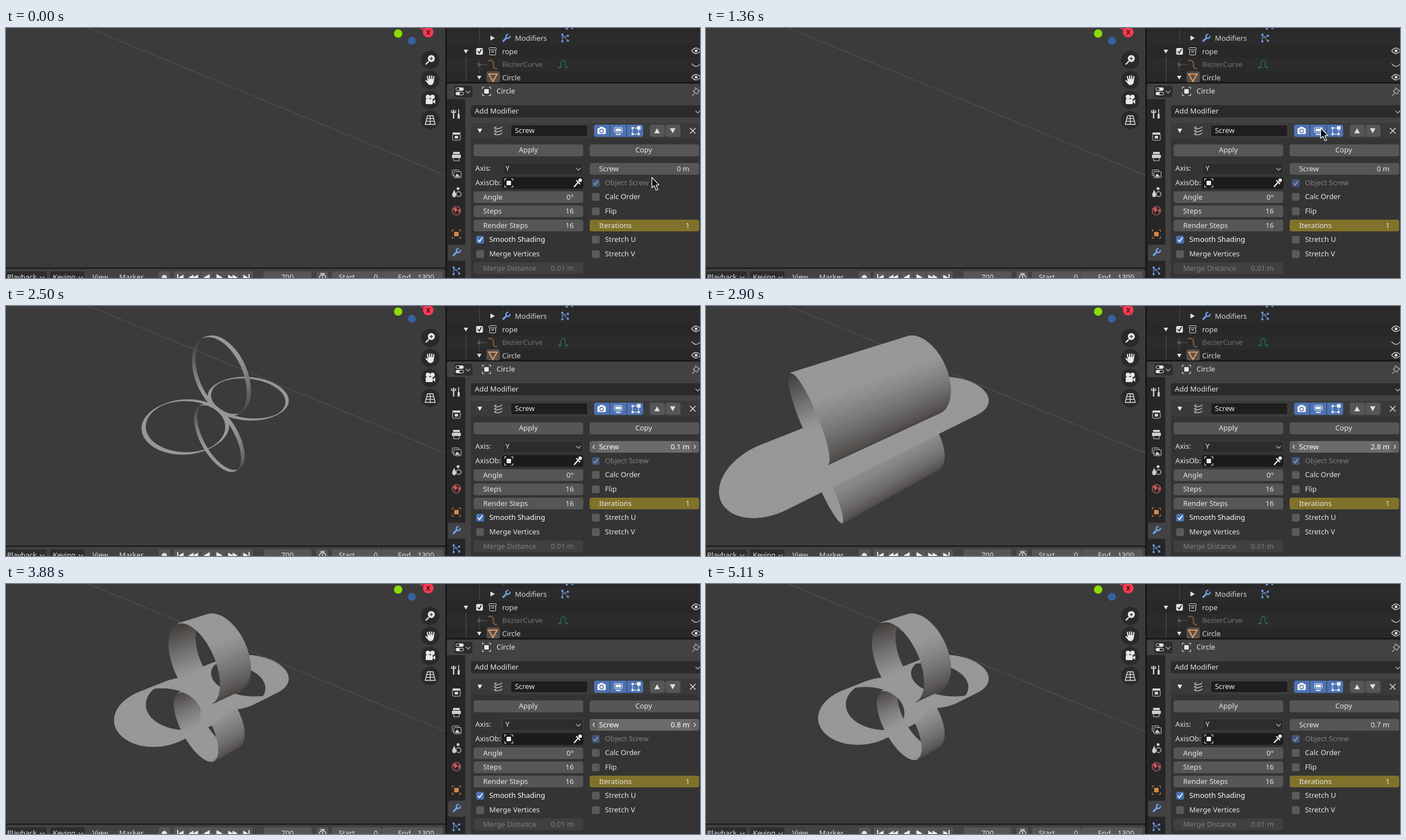
An HTML page with a canvas for the animation above (5210 ms loop, 1245 px wide and 450 px high).

```html
<!DOCTYPE html>
<html lang="en">
<head>
<meta charset="utf-8">
<title>Screw modifier</title>
<style>
html, body { margin: 0; width: 100%; height: 100%; overflow: hidden; background: #3b3b3b; }
canvas { display: block; width: 1245px; height: 450px; }
</style>
</head>
<body>
<canvas id="stage" width="1245" height="450"></canvas>
<script>
const W = 1245, H = 450, LOOP = 5210;
const FONT = '12.9px "Noto Sans", "Open Sans", sans-serif';
const screen = document.getElementById('stage').getContext('2d');
const layer = document.createElement('canvas');
layer.width = W; layer.height = H;
let g = layer.getContext('2d');

// ---- drawing helpers ----
function box(x, y, w, h, fill, r = 0, edge) {
  g.beginPath();
  g.roundRect(x, y, w, h, r);
  if (fill) { g.fillStyle = fill; g.fill(); }
  if (edge) { g.strokeStyle = edge; g.lineWidth = 1; g.stroke(); }
}
function dot(x, y, r, fill, edge, lw = 1.3) {
  g.beginPath();
  g.arc(x, y, r, 0, 7);
  if (fill) { g.fillStyle = fill; g.fill(); }
  if (edge) { g.strokeStyle = edge; g.lineWidth = lw; g.stroke(); }
}
function poly(pts, fill, edge, lw = 1, close = true) {
  g.beginPath();
  for (let i = 0; i < pts.length; i += 2) g.lineTo(pts[i], pts[i + 1]);
  if (close) g.closePath();
  if (fill) { g.fillStyle = fill; g.fill(); }
  if (edge) { g.strokeStyle = edge; g.lineWidth = lw; g.stroke(); }
}
const line = (pts, color, lw = 1.4) => poly(pts, null, color, lw, false);
function path(d, color, lw = 1.5) {
  g.strokeStyle = color; g.lineWidth = lw;
  g.stroke(new Path2D(d));
}
function text(s, x, cy, color = '#e6e6e6', align = 'left') {
  g.font = FONT; g.textAlign = align; g.fillStyle = color;
  g.fillText(s, x, cy + 4.2);
}
function tri(x, y, dir, s = 4, color = '#e0e0e0') {
  const k = s * 0.9;
  if (dir === 'd') poly([x - s, y - k, x + s, y - k, x, y + k], color);
  if (dir === 'u') poly([x - s, y + k, x + s, y + k, x, y - k], color);
  if (dir === 'r') poly([x - k, y - s, x - k, y + s, x + k, y], color);
  if (dir === 'l') poly([x + k, y - s, x + k, y + s, x - k, y], color);
}
const chevron = (x, y, s = 4) => line([x - s, y - s / 2, x, y + s / 2, x + s, y - s / 2], '#b5b5b5', 1.3);
function corners(x, y, color) {
  box(x - 4, y - 4, 8, 8, color, 1);
  for (const [a, b] of [[-1, -1], [1, -1], [1, 1], [-1, 1]])
    line([x + a * 4, y + b * 7.5, x + a * 7.5, y + b * 7.5, x + a * 7.5, y + b * 4], color, 1);
}
function wrench(x, y, color) {
  line([x - 6, y + 6, x + 2, y - 2], color, 3.4);
  g.beginPath(); g.arc(x + 3.5, y - 3.5, 3.6, -0.3, 4.9);
  g.strokeStyle = color; g.lineWidth = 2.4; g.stroke();
}
function nodes(x, y, color) {
  line([x - 5, y + 6, x - 5, y - 6, x + 5, y + 5], color, 1.1);
  line([x - 5, y, x + 5, y - 4], color, 1.1);
  for (const [a, b] of [[-5, -6], [-5, 6], [5, -4], [5, 5]]) dot(x + a, y + b, 2, color);
}
function eye(x, y) {
  path(`M${x - 8} ${y}Q${x} ${y - 10} ${x + 8} ${y}Q${x} ${y + 10} ${x - 8} ${y}Z`, '#d8d8d8', 1.3);
  dot(x, y, 2.6, '#d8d8d8');
}

// ---- panel widgets ----
const NORMAL = '#565656';
function field(x, y, w, label, value, fill = NORMAL, color) {
  box(x, y, w, 21, fill, 4);
  text(label, x + 17, y + 10.5, color);
  text(value, x + w - 17, y + 10.5, color, 'right');
}
function check(x, cy, label, on, dim) {
  box(x, cy - 7, 14, 14, on ? (dim ? '#40557c' : '#4b74b6') : '#5a5a5a', 3);
  if (on) line([x + 3, cy, x + 6, cy + 3.5, x + 11, cy - 4], dim ? '#9a9a9a' : '#fff', 1.7);
  text(label, x + 23.5, cy, dim ? '#808080' : on ? '#fff' : undefined);
}

function viewport() {
  box(0, 0, 788, 431, '#3b3b3b');
  line([148, 0, 788, 265], '#575757', 1);
}

function gizmos() {
  line([757, 7, 738, -3], '#fb3a52', 2);
  dot(703.5, 10, 7.5, '#8bdc00');
  dot(728, 23, 7.2, '#35629f');
  dot(757.5, 7.5, 9.5, '#fb3a52');
  line([754.5, 3.5, 760.5, 12], '#3a0d14', 1.4);
  line([760.5, 3.5, 754.5, 12], '#3a0d14', 1.4);
  for (const y of [57.5, 93.5, 129.5, 165.5]) dot(761, y, 16.5, '#2a2a2a');
  const c = '#e8e8e8';
  dot(763, 55, 6.2, c);
  line([758.5, 60, 753, 65.5], c, 2.4);
  line([760, 55, 766, 55], '#2a2a2a', 1.3);
  line([763, 52, 763, 58], '#2a2a2a', 1.3);
  poly([756, 92, 768, 92, 767, 99, 764, 102.5, 759, 102.5, 752, 94.5, 753.5, 93.5, 757, 96], c);
  for (let i = 0; i < 4; i++) line([757.3 + i * 3.1, 94, 755.8 + i * 4, 85 + Math.abs(i - 1.4)], c, 2.1);
  dot(757, 124, 4, c); dot(765, 124, 4, c);
  box(753, 128, 12.5, 9, c, 1);
  poly([765, 132.5, 770, 128.5, 770, 136.5], c);
  line([756, 158, 766, 158, 770, 173.5, 752, 173.5, 756, 158], c, 1.3);
  line([754.5, 163, 767.5, 163], c, 1.3); line([753.5, 168, 768.5, 168], c, 1.3);
  line([761, 158, 761, 173.5], c, 1.3);
}

function timeline() {
  box(0, 431, 791, 19, '#1b1b1b');
  box(0, 433.5, 788, 30, '#424242', 4);
  box(-6, 438, 79, 22, '#2d2d2d', 4);
  box(79, 438, 62, 22, '#2d2d2d', 4);
  text('Playback', 2, 449); chevron(65, 449);
  text('Keying', 84, 449); chevron(134, 449);
  text('View', 155, 449); text('Marker', 203, 449);
  box(274, 438, 21, 22, NORMAL, 4);
  dot(284, 449, 4.6, '#e4e4e4');
  box(301, 438, 142, 22, NORMAL, 4);
  for (let i = 0; i < 5; i++) line([325 + i * 23.5, 438, 325 + i * 23.5, 450], '#424242', 1);
  const c = '#eee';
  box(307, 443, 2, 12, c); tri(314, 449, 'l', 5, c);
  tri(332, 449, 'l', 5, c); tri(340, 449, 'l', 5, c);
  tri(360, 449, 'l', 6, c); tri(383, 449, 'r', 6, c);
  tri(403, 449, 'r', 5, c); tri(411, 449, 'r', 5, c);
  tri(430, 449, 'r', 5, c); box(435, 443, 2, 12, c);
  box(462, 438, 86, 22, NORMAL, 4);
  text('700', 505, 449, undefined, 'center');
  box(557, 438, 21, 22, NORMAL, 4);
  dot(568, 450, 6, null, c); line([568, 450, 568, 446], c); line([564, 442, 572, 442], c);
  box(585, 438, 88, 22, NORMAL, 4); box(674, 438, 110, 22, NORMAL, 4);
  text('Start', 597, 449); text('0', 667, 449, undefined, 'right');
  text('End', 703, 449); text('1300', 768, 449, undefined, 'right');
}

function outliner() {
  box(788, 0, 457, H, '#181818');
  box(791, 0, 454, 97, '#282828');
  box(791, 7, 454, 24, '#2b2b2b'); box(791, 54, 454, 24, '#2b2b2b');
  line([825.5, 52, 825.5, 97], '#555', 1);
  line([849.5, 0, 849.5, 28], '#484848', 1);
  line([849.5, 57, 849.5, 82], '#484848', 1);
  wrench(897, -6, '#6d9ae0');
  text('Screw Modifier', 913, -8, '#6d9ae0');
  nodes(1011, -5, '#6d9ae0');
  tri(873, 18, 'r', 4.4);
  wrench(897, 18.5, '#6d9ae0');
  text('Modifiers', 913, 19, '#d6d6d6');
  nodes(1003, 18, '#6d9ae0');
  tri(825, 42.5, 'd');
  box(843.5, 36, 12, 12, '#e4e4e4', 2);
  line([846, 42, 849, 45, 853, 38], '#222', 1.7);
  box(866.5, 35.5, 13, 4, null, 1, '#e0e0e0');
  box(867.5, 39.5, 11, 9, null, 1, '#e0e0e0');
  line([870.5, 43, 875.5, 43], '#e0e0e0', 1.5);
  text('rope', 890, 43, '#d6d6d6');
  eye(1238, 41);
  tri(850, 66, 'r', 4, '#5a5a5a');
  line([850, 66, 864, 66], '#5a5a5a', 1);
  path('M865 59C873 56 875 62 874.500 66C874 72 877 74 881 73', '#76573c', 2.4);
  text('BezierCurve', 890, 66, '#737373');
  path('M992 71H996C992 54 1006 56 1003 66C1003 70 1004 71 1006 71', '#1f7a4d', 1.3);
  dot(992.5, 71, 1.8, '#1f7a4d'); dot(1006, 71, 1.8, '#1f7a4d');
  path('M1230 64Q1238 74 1246 64', '#c8c8c8', 1.3);
  tri(849, 89.5, 'd');
  box(862, 78, 24, 20, '#55504c', 4);
  poly([866, 83, 881, 83, 873.5, 96], null, '#e59a5f', 2.2);
  text('Circle', 890, 90, '#d6d6d6');
  eye(1238, 88.5);
}

function tabs() {
  box(791, 128, 33, 330, '#262626');
  box(793, 390, 34, 29, '#424242', 4);
  const c = '#cfcfcf';
  line([803, 147, 803, 163], c, 2.4); line([799.5, 148, 799.5, 152, 806.5, 152, 806.5, 148], c, 1.6);
  line([812, 146, 812, 155], c, 1.6); line([812, 155, 812, 163], c, 3.8);
  box(801, 191, 14, 11, null, 2, c); box(801, 188, 14, 4, c, 1); box(805, 194, 6, 5, c);
  box(802, 223, 12, 4, c); box(800, 228, 16, 6, c, 1); box(803, 233, 10, 6, null, 0, c);
  box(800.5, 255.5, 12, 10, null, 1, c); box(803.5, 258.5, 13, 11, '#262626', 1, c);
  poly([805, 268, 809, 262, 815, 268], c);
  poly([800, 300, 804, 291, 808, 300], c); dot(804, 301, 3.4, c);
  dot(812, 299, 4.4, null, c); dot(811, 289, 2.6, c);
  dot(808, 329, 7.6, null, '#d05b62', 1.4);
  poly([802, 325, 807, 323, 810, 328, 806, 331, 807, 335], '#d05b62');
  poly([811, 325, 815, 328, 812, 334], '#d05b62');
  corners(808, 371, '#d98845');
  wrench(808, 404, '#6ba0ec');
  nodes(808, 437, '#6d9ae0');
}

function properties() {
  box(791, 100, 454, 360, '#424242', 4);
  box(804, 104, 33, 21, '#2d2d2d', 4);
  for (const [y, k] of [[110, 815], [118, 809]]) {
    box(807, y - 2.5, 14, 5, null, 2.5, '#e4e4e4');
    box(k - 2, y - 2.5, 7, 5, '#e4e4e4', 2);
  }
  chevron(829, 115);
  corners(862, 114, '#e6e6e6');
  text('Circle', 880, 114);
  path('M1236 107L1245 114M1238 109L1233 114L1240 119L1243 113M1236 117L1231 122', '#aaa', 1.4);
  tabs();
  box(834, 139, 420, 22, '#2b2b2b', 4);
  text('Add Modifier', 841, 150); chevron(1241, 151);

  box(834, 171, 420, 300, '#343434', 4);
  box(834, 171, 420, 28, '#3a3a3a', 4);
  tri(850, 185, 'd', 4.2, '#eee');
  for (const y of [179, 184.5, 190])
    path(`M880 ${y - 1.5}Q873 ${y + 1} 879 ${y + 2}Q888 ${y + 2.5} 890 ${y - 1.5}`, '#d6d6d6', 1.3);
  box(905.5, 174.5, 138, 21, '#1e1e1e', 4, '#484848');
  text('Screw', 913, 185);
  box(1155, 174, 27, 22, NORMAL, 4); box(1183, 174, 27, 22, NORMAL, 4);
  tri(1168, 185, 'u', 5); tri(1196, 185, 'd', 5);
  line([1227, 180, 1237, 190], '#ddd'); line([1237, 180, 1227, 190], '#ddd');

  box(839, 209.5, 196.5, 21.5, NORMAL, 4); box(1047, 209.5, 196.5, 21.5, NORMAL, 4);
  text('Apply', 937, 220, undefined, 'center');
  text('Copy', 1144, 220, undefined, 'center');
  text('Axis:', 842, 253);
  box(890.5, 243, 145, 21, '#2c2c2c', 4, '#424242');
  text('Y', 896, 253); chevron(1027, 254);
  text('AxisOb:', 842, 279);
  box(890, 268.5, 145.5, 21, '#1b1b1b', 4);
  corners(902, 279, '#eee');
  line([1019, 286, 1027, 277], '#eee', 2.4); line([1023, 274, 1030, 281], '#eee', 2); dot(1030, 274, 3.2, '#eee');

  field(839, 294, 196.5, 'Angle', '0°');
  field(839, 319.5, 196.5, 'Steps', '16');
  field(839, 345, 196.5, 'Render Steps', '16');
  check(843.5, 381, 'Smooth Shading', true);
  check(843.5, 407, 'Merge Vertices');
  field(839, 422, 196.5, 'Merge Distance', '0.01 m', '#404040', '#7e7e7e');
  check(1051, 279, 'Object Screw', true, true);
  check(1051, 304, 'Calc Order');
  check(1051, 330, 'Flip');
  field(1047, 345, 196.5, 'Iterations', '1', '#80722a');
  check(1051, 381, 'Stretch U');
  check(1051, 407, 'Stretch V');
}

function toggles(on) {
  const blue = '#4d73b4';
  box(1055, 174, 28, 22, blue, [4, 0, 0, 4]);
  box(1084, 174, 29, 22, on ? blue : NORMAL);
  box(1114, 174, 29, 22, on ? blue : '#435679', [0, 4, 4, 0]);
  const c = '#f0f0f0', e = on ? c : '#9a9a9a';
  box(1061, 180, 15, 11, c, 2); box(1065, 178, 7, 3, c);
  dot(1068.5, 185.5, 3.2, null, blue, 1.4);
  box(1091.5, 179, 14, 9, null, 1, c); box(1093.5, 181, 10, 5, c);
  box(1094, 190.5, 9, 2, c);
  box(1124, 180, 11, 11, null, 0, e);
  for (const [x, y] of [[1124, 180], [1124, 191], [1135, 191]]) box(x - 1.8, y - 1.8, 3.6, 3.6, e);
  box(1132, 176.5, 6.5, 6.5, e);
}

function screwField(value, hover) {
  box(1047, 243, 196.5, 21, hover ? '#606060' : NORMAL, 4);
  if (hover) {
    box(1061, 243, 168, 21, '#6b6b6b');
    line([1056, 250, 1053, 253.5, 1056, 257], '#e6e6e6', 1.2);
    line([1234, 250, 1237, 253.5, 1234, 257], '#e6e6e6', 1.2);
  }
  const label = value ? value.toFixed(1) + ' m' : '0 m';
  text('Screw', 1064, 253.5, hover ? '#fff' : undefined);
  text(label, 1226, 253.5, hover ? '#fff' : undefined, 'right');
}

// ---- four rings swept along the Y axis ----
const SEG = 72;
function project(x, y, z) {
  const w = 1 - 0.1 * x + 0.052 * y - 0.073 * z;
  return [382.4 + (45.2 * x + 55.3 * y + 1.3 * z) / w, 184.7 + (33.7 * x - 24.4 * y - 54.4 * z) / w];
}
function ringPoint(ring, i, shift) {
  const a = i / SEG * 2 * Math.PI, c = Math.cos(a), s = Math.sin(a);
  return ring.flat ? project(c, ring.off + s - shift, 0) : project(c, -shift, ring.off + s);
}
const rings = [{ off: -1 }, { off: 1, flat: true }, { off: -1, flat: true }, { off: 1 }];

function shade(nz) {
  const t = Math.min(1, Math.max(0, (nz + 0.7) / 1.5)) ** 1.3;
  const mix = (a, b) => Math.round(a + (b - a) * t);
  return `rgb(${mix(68, 151)},${mix(64, 152)},${mix(62, 153)})`;
}
function sweep(ring, shift) {
  const quads = [];
  for (let i = 0; i < SEG; i++) {
    const a = ringPoint(ring, i, 0), b = ringPoint(ring, i + 1, 0);
    const c = ringPoint(ring, i + 1, shift), d = ringPoint(ring, i, shift);
    const front = (b[0] - a[0]) * (d[1] - a[1]) - (b[1] - a[1]) * (d[0] - a[0]) < 0;
    const up = Math.sin((i + 0.5) / SEG * 2 * Math.PI);
    const color = ring.flat ? '#979899' : shade(front ? up : -up);
    quads.push({ pts: [...a, ...b, ...c, ...d], front, color });
  }
  quads.sort((p, q) => p.front - q.front);
  for (const q of quads) poly(q.pts, q.color, q.color, 1);
}
function outline(ring) {
  const pts = [];
  for (let i = 0; i < SEG; i++) pts.push(...ringPoint(ring, i, 0));
  poly(pts, null, '#0c0c0c', 1);
}

// ---- timing ----
const depth = [[0, 0], [2500, 0.1], [2620, 0.5], [2750, 1.3], [2900, 2.8], [3030, 3.3], [3180, 3.6],
  [3320, 2.6], [3450, 2.4], [3600, 0.8], [3730, 1.2], [3880, 0.8], [4020, 0.3], [4150, 0.7]];
const pointer = [[0, 1158, 268], [120, 1138, 215], [250, 1112, 171], [390, 1109, 169], [520, 1106, 167],
  [660, 1102, 175], [940, 1100, 172], [1220, 1102, 175], [1360, 1102, 179], [1640, 1108, 214],
  [1770, 1120, 258, 'drag'], [1920, 1110, 255, 'drag'], [2050, 1102, 253, 'drag'], [2200, 1099, 251, 'drag'],
  [2350, 0, 0, 'none'], [4290, 1108, 252, 'drag'], [4420, 1118, 263], [4560, 1136, 330],
  [4690, 1152, 400], [4840, 1172, 424], [4960, 1184, 445], [5110, 0, 0, 'none']];
const at = (steps, t) => steps.findLast(s => s[0] <= t);
const within = (t, a, b) => t >= a && t < b;

function cursor([, x, y, kind]) {
  if (kind === 'none') return;
  g.save();
  g.translate(x, y);
  g.lineJoin = 'round';
  if (kind === 'drag')
    poly([-10.5, 0, -5, -4.5, -5, -1.5, 5, -1.5, 5, -4.5, 10.5, 0, 5, 4.5, 5, 1.5, -5, 1.5, -5, 4.5], '#111', '#fff', 1);
  else
    poly([0.7, 1, 0.7, 19.5, 4.8, 15.8, 8.3, 24, 11.4, 22.7, 8, 14.8, 13.3, 14.3], '#0a0a0a', '#fff', 1.2);
  g.restore();
}

viewport(); gizmos(); timeline(); outliner(); properties();
g = screen;

function frame(now) {
  const t = now % LOOP, v = at(depth, t)[1], off = within(t, 660, 1360);
  g.drawImage(layer, 0, 0);
  if (off) rings.forEach(outline);
  else if (v) rings.forEach(r => sweep(r, v * 1.015));
  toggles(!off);
  screwField(v, within(t, 1770, 4560));
  cursor(at(pointer, t));
  requestAnimationFrame(frame);
}
requestAnimationFrame(frame);
</script>
</body>
</html>
```
